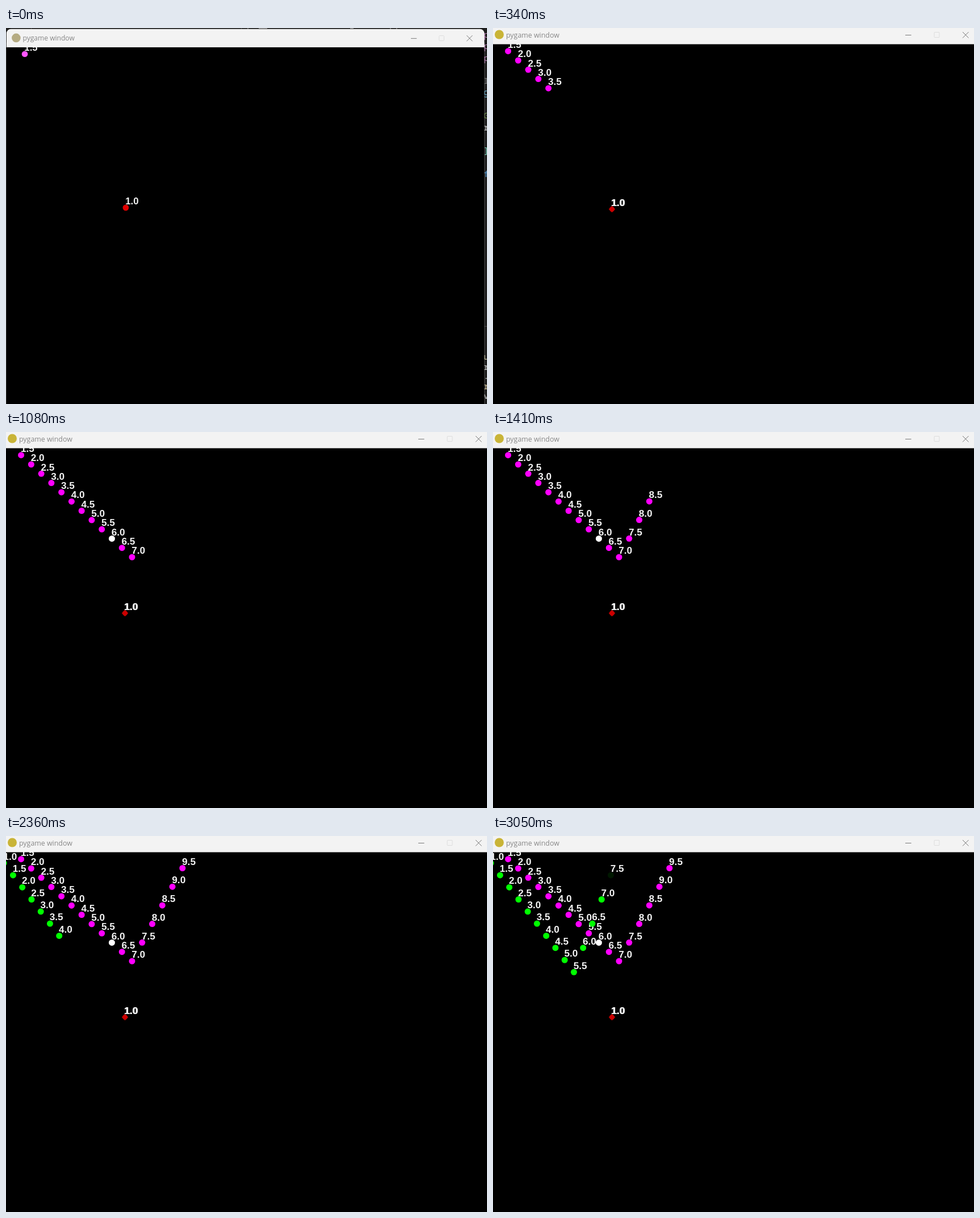
Recreate the animation shown at these times as an HTML page. Size 847 by 661 pixels, loop 3380 ms.

```html
<!DOCTYPE html>
<html lang="en">
<head>
<meta charset="utf-8">
<title>pygame window</title>
<style>
  html, body { margin: 0; width: 100%; height: 100%; overflow: hidden; background: #1f1f1f; }
  svg { display: block; width: 847px; height: 661px; }
  .label { font: bold 17.2px "Liberation Sans", Arial, sans-serif; fill: #f2f2f2; }
  .title { font: 12.4px "Open Sans", "Noto Sans", sans-serif; fill: #878787; }
  .code { font: 15px "Noto Sans Mono", monospace; }
</style>
</head>
<body>
<svg id="stage" viewBox="0 0 847 661">
  <g id="editor">
    <rect width="847" height="661" fill="#1f1f1f"/>
    <path d="M414.500 0V2M44.500 0V2M842 524.500H847" stroke="#4a4a4a"/>
    <path d="M426 0V2M445 .5H460M606 .5H612M677 0V2M688 0V2" stroke="#aaa"/>
  </g>
  <g id="window">
    <rect x="-6.500" y="-4.500" width="865.500" height="720" rx="8" fill="#f3f3f3"/>
    <g id="points">
      <rect x="-6.500" y="28.300" width="865.500" height="690"/>
    </g>
    <rect x="-6.500" y="20" width="865.500" height="8.300" fill="#f3f3f3"/>
    <circle id="icon" cx="11" cy="11.500" r="8"/>
    <text class="title" x="23" y="16.500">pygame window</text>
    <g fill="none">
      <path d="M726 12.500H736.500" stroke="#777"/>
      <rect x="777" y="7.500" width="9" height="9" rx="1" stroke="#ddd"/>
      <path d="M827 7L837.500 17.500M837.500 7L827 17.500" stroke="#777"/>
    </g>
  </g>
</svg>
<script>
const LOOP = 3380;
const MAGENTA = '#ff00ff', GREEN = '#00ff00';
const $ = id => document.getElementById(id);

function add(parent, tag, attrs, text = '') {
  const node = document.createElementNS($('stage').namespaceURI, tag);
  for (const key in attrs) node.setAttribute(key, attrs[key]);
  node.textContent = text;
  return parent.appendChild(node);
}

const timed = [];
function addPoint(x, y, value, color, start) {
  const group = add($('points'), 'g', {});
  const dot = add(group, 'circle', { cx: x, cy: y, r: 5.5, fill: color });
  add(group, 'text', { class: 'label', x: x - 0.7, y: y - 5.8 }, value.toFixed(1));
  timed.push({ group, start });
  return dot;
}

// A falling run of points that bounces back up at half the count per height.
function addTrack({ x, y, dx, dy, first, turn, rise, color, starts, special }) {
  starts.forEach((start, i) => {
    const after = Math.max(0, i - turn);
    const value = first + i / 2;
    addPoint(x + dx * i, y + dy * (i - after) - rise * after, value,
             special[value] || color, start);
  });
}

addTrack({
  x: 26.6, y: 40.7, dx: 17.76, dy: 16.3, first: 1.5, turn: 11, rise: 32.7, color: MAGENTA,
  starts: [0, 70, 140, 270, 340, 470, 540, 670, 740, 870,
           1010, 1080, 1210, 1280, 1410, 1480, 1610],
  special: { 6: '#ffffff' }
});
addTrack({
  x: -3.8, y: 47.6, dx: 16.25, dy: 21.3, first: 1, turn: 9, rise: 42.6, color: GREEN,
  starts: [1680, 1810, 1880, 2010, 2150, 2220, 2360, 2430, 2560, 2630,
           2780, 2850, 2980, 3050],
  special: { 7.5: '#001800' }
});

const firstDot = timed[0].group.firstChild;
const redDot = addPoint(209.5, 318.5, 1, '#e00000', 0);
const settled = add($('points'), 'g', {});
add(settled, 'path', { d: 'M209.500 312.800l5.700 5.700l-5.700 5.700l-5.700 -5.700z', fill: '#cc0000' });
add(settled, 'text', { class: 'label', x: 207.8, y: 313.2 }, '1.0');
timed.push({ group: settled, start: 70 });

const codeEdge = [
  ['p', 17, '#c586c0'], ['p', 37, '#c586c0'], ['p', 58, '#c586c0'], ['I', 98, '#777'],
  ['g', 118, '#6cb6d8'], ['G', 159, '#6a8a45'], ['r', 180, '#d4d4d4'], [']', 220, '#7fd6c0'],
  ['f', 262, '#569cd6'], ['u', 583, '#d8d0a8'], ['r', 601, '#ccc'], ['.', 617, '#ccc'],
  ['r', 635, '#d8c8a0'], ['v', 652, '#ccc']
];
for (const [char, y, fill] of codeEdge) add($('editor'), 'text', { class: 'code', x: 841, y, fill }, char);

// Opening zoom: [start, progress towards the final size]
const zoom = [[0, 0], [70, 0.7], [140, 0.94], [200, 1]];

function draw(now) {
  const t = now % LOOP;
  const progress = zoom.filter(([start]) => t >= start).pop()[1];
  const rest = 1 - progress;
  $('window').setAttribute('transform',
    `translate(${7.2 * rest} ${6.2 * rest}) scale(${1 - 0.0278 * rest})`);

  const opening = t < 70;
  firstDot.setAttribute('fill', opening ? '#ff55ff' : MAGENTA);
  redDot.setAttribute('fill', opening ? '#e00000' : '#800000');
  redDot.setAttribute('r', opening ? 5.5 : 4.6);
  $('icon').setAttribute('fill', opening ? '#b5ab82' : '#c9b437');

  for (const { group, start } of timed) group.style.display = t >= start ? '' : 'none';
}

const begin = performance.now();
function tick() {
  draw(performance.now() - begin);
  requestAnimationFrame(tick);
}
tick();
</script>
</body>
</html>
```
